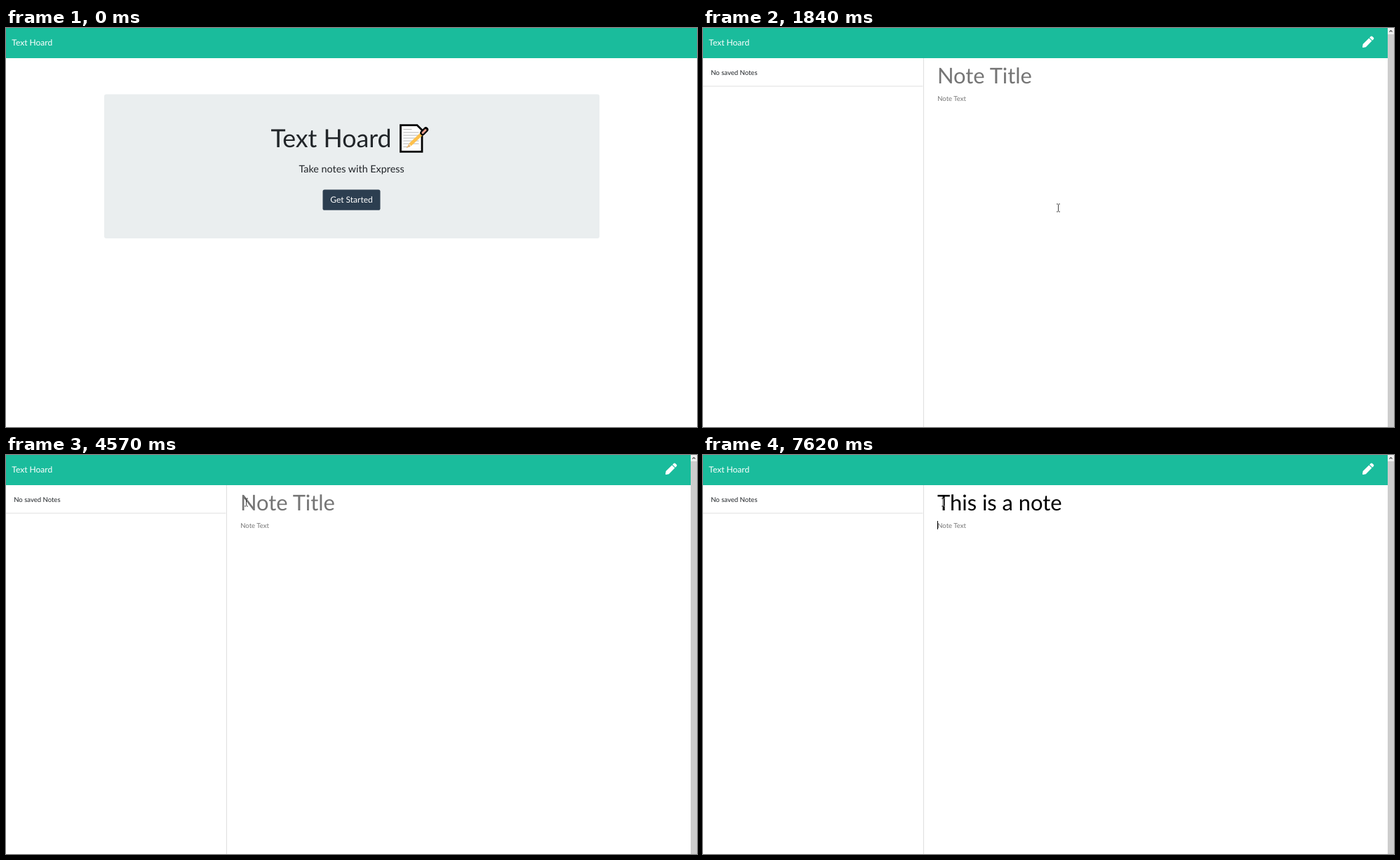
Write an HTML page that moves like this. It is 985x569 px and loops after 8000 ms.

```html
<!DOCTYPE html>
<html lang="en">
<head>
<meta charset="utf-8">
<title>Text Hoard</title>
<style>
html, body { margin: 0; width: 100%; height: 100%; overflow: hidden; background: #fff; }
svg { display: block; width: 100vw; height: 100vh; }
text { font: 12px Lato, sans-serif; fill: #212529; white-space: pre; text-rendering: geometricPrecision; }
.mid { text-anchor: middle; }
.light { fill: #fff; }
.small { font-size: 9.54px; }
.hint { fill: #757575; }
.pointer { fill: #fff; stroke: #111; stroke-width: 1; stroke-linejoin: round; }
#ibeam { fill: none; stroke: #bbb; mix-blend-mode: difference; }
</style>
</head>
<body>
<svg viewBox="0 0 985 569">
  <rect width="985" height="569" fill="#fff"/>
  <rect width="985" height="43" fill="#1abc9c"/>
  <text class="light" x="8.3" y="25">Text Hoard</text>

  <g id="home">
    <rect x="140" y="94.5" width="706" height="205.5" rx="3" fill="#eaeeef"/>
    <text x="377.5" y="170" style="font-size:35.7px">Text Hoard</text>
    <g fill="none" stroke-linecap="round">
      <path d="M562.5 138.6H586l7 7V176.4H562.5z" fill="#fff" stroke="#000" stroke-width="2.8"/>
      <path d="M567 144.5H578M567 149H588M567 153H588M567 157H588M567 161H588M567 165H588M567 169.5H575" stroke="#b5b5b5" stroke-width="1.2"/>
      <path d="M570.5 171.5l3.5-6 3 3z" fill="#e8b878"/>
      <path d="M576 166.500L594 149.500" stroke="#fdc04c" stroke-width="4.6" stroke-linecap="butt"/>
      <path d="M594 149.500L598.400 145" stroke="#000" stroke-width="7.4"/>
      <path d="M594 149.500L598 145.500" stroke="#e9a08e" stroke-width="3"/>
    </g>
    <text class="mid" x="492.6" y="206" style="font-size:14.33px">Take notes with Express</text>
    <rect id="button" x="451.5" y="230.5" width="82" height="29.3" rx="2.6"/>
    <text class="mid light" x="492.5" y="249">Get Started</text>
  </g>

  <g id="notes">
    <path d="M0 83H313.500M314.500 43V569" stroke="#dfdfdf"/>
    <text class="small" x="11.2" y="67">No saved Notes</text>
    <text id="title" x="334" y="79" style="font-size:30.9px"></text>
    <text class="small hint" x="334.2" y="104">Note Text</text>
    <rect id="caret" width="1"/>
    <path transform="translate(940 11.500) scale(.032)" fill="#fff" d="M498 142l-46 46q-8 8-17 0L324 77q-8-8 0-17l46-46q34-28 68 0l60 60q28 34 0 68zM284 100L22 362 0 484q-1 28 28 28l122-22 262-262q8-8 0-17L301 100q-8-8-17 0z"/>
    <rect x="976" width="9" height="569" fill="#cdcdcd"/>
    <rect x="976" width="9" height="9" fill="#f0f0f0"/>
    <path d="M978.500 5.500l2-2 2 2" fill="none" stroke="#505050" stroke-width="1.2"/>
  </g>

  <path id="arrow" class="pointer" d="M.500.500V11l2.400-2.200 1.700 3.700 1.700-.800-1.600-3.600H7.600z"/>
  <path id="hand" class="pointer" d="M-1.300 8V1.500q0-1.200 1.200-1.200t1.200 1.200V5.500q2-.800 2.300.500 1.500-.500 1.800.700 1.300-.200 1.300 1V11q0 2-1.300 4H-.500Q-2 12.500-4 9.500q-.300-1.500 1-1.500z"/>
  <path id="ibeam" d="M-2.500-5.500H-.500M.500-5.500H2.500M0-5V5M-2.500 5.500H-.500M.500 5.500H2.500"/>
</svg>
<script>
const LOOP = 8000, PAGE_AT = 1840, TAB_AT = 6520;
const $ = id => document.getElementById(id);
const show = (id, on) => $(id).style.display = on ? '' : 'none';
const within = (t, a, b) => t >= a && t < b;

// Pointer strokes: time span, steps, start, bend, end, ease-out power.
const moves = [
  { t0: 70, t1: 840, n: 11, from: [951, 566], bend: [740, 425], to: [530, 293], pow: 1.7 },
  { t0: 910, t1: 1470, n: 8, from: [530, 293], bend: [518, 272], to: [506, 256], pow: 1.5 },
  { t0: 2170, t1: 2860, n: 10, from: [506, 256], bend: [240, -20], to: [116, 57], pow: 1.5 },
  { t0: 3330, t1: 3870, n: 8, from: [116, 57], bend: [229, 75], to: [342, 67], pow: 2.6 }
];

function pointerAt(t) {
  const m = moves.filter(m => t >= m.t0).pop();
  if (!m) return null;
  const step = Math.floor((t - m.t0 + 4) / (m.t1 - m.t0) * (m.n - 1));
  const f = m === moves[0] ? step / (m.n - 1) : (step + 1) / m.n;
  const e = 1 - Math.pow(1 - Math.min(1, f), m.pow), r = 1 - e;
  return m.from.map((a, i) => r * r * a + 2 * r * e * m.bend[i] + e * e * m.to[i]);
}

const phrase = 'This is a note';
const keyTimes = [4720, 4950, 5120, 5270, 5270, 5420, 5590, 5660, 5740, 5890, 5970, 6120, 6200, 6350];

function pointerKind(x, y, home) {
  if (home) return within(x, 451, 534) && within(y, 230, 260) ? 'hand' : 'arrow';
  if (y < 43) return 'arrow';
  if (x > 314) return 'ibeam';
  return y < 83 ? 'hand' : 'arrow';
}

function drawPointer(t, home) {
  const p = pointerAt(t);
  const kind = p && pointerKind(...p, home);
  for (const id of ['arrow', 'hand', 'ibeam']) show(id, id === kind);
  if (p) {
    const [x, y] = p.map(Math.round);
    const half = kind === 'ibeam' ? 0.5 : 0;
    $(kind).setAttribute('transform', `translate(${x + half} ${y + half})`);
  }
  return kind;
}

function drawNotes(t) {
  const typed = phrase.slice(0, keyTimes.filter(k => t >= k).length);
  const title = $('title');
  title.textContent = typed || 'Note Title';
  title.style.fill = typed ? '#000' : '#757575';

  const inBody = t >= TAB_AT;
  show('caret', within(t, 4020, 4570) || within(t, 4720, 7070) || t >= 7620);
  const width = typed && !inBody ? title.getComputedTextLength() : 0;
  const caret = $('caret');
  caret.setAttribute('x', 334 + Math.round(width));
  caret.setAttribute('y', inBody ? 94 : 51);
  caret.setAttribute('height', inBody ? 12 : 33);
}

function draw(now) {
  const t = now % LOOP, home = t < PAGE_AT;
  show('home', home);
  show('notes', !home);
  const kind = drawPointer(t, home);
  if (home) $('button').style.fill = kind === 'hand' ? '#1a252f' : '#2c3e50';
  else drawNotes(t);
}

const start = performance.now();
function frame() {
  draw(performance.now() - start);
  requestAnimationFrame(frame);
}
frame();
</script>
</body>
</html>
```
